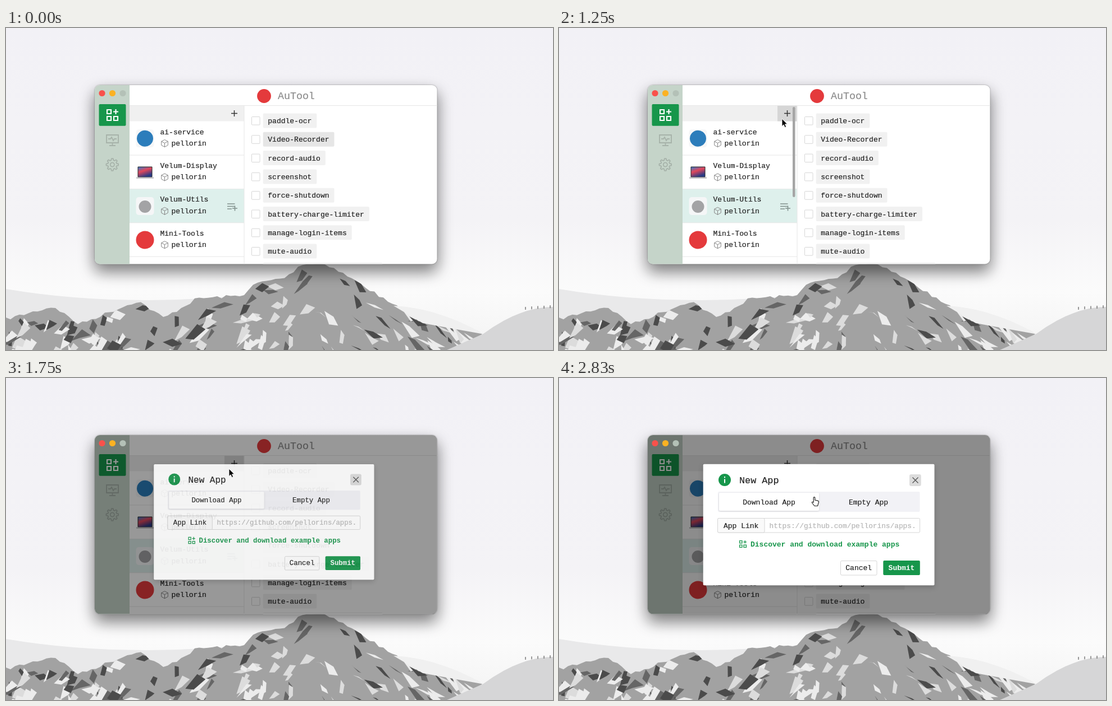
These frames come from a looping animation (974 px wide and 575 px high, 2910 ms). An HTML page:

```html
<!DOCTYPE html>
<html lang="en">
<head>
<meta charset="utf-8">
<title>AuTool</title>
<style>
html, body { margin: 0; width: 100%; height: 100%; overflow: hidden; }
svg { display: block; width: 974px; height: 575px; }
text {
  font: 13px "Liberation Mono", "Courier New", monospace;
  color: #222; fill: currentColor; stroke: currentColor; stroke-width: .2px;
}
.mid { text-anchor: middle; }
.bold { font-weight: bold; stroke: none; }
.shadow { filter: drop-shadow(0 13px 14px #0006) drop-shadow(0 0 1px #0006); }
</style>
</head>
<body>
<svg id="stage" viewBox="0 0 974 575"></svg>
<script>
const GREEN = '#17964b', RED = '#e43a3c', BORDER = '#d6d6d6', DULL = '#a6b2a9', LOOP = 2910;

const rect = (x, y, w, h, fill, more = '') =>
  `<rect x="${x}" y="${y}" width="${w}" height="${h}" fill="${fill}" ${more}/>`;
const disc = (x, y, r, fill, more = '') => `<circle cx="${x}" cy="${y}" r="${r}" fill="${fill}" ${more}/>`;
const label = (x, y, s, more = '') => `<text x="${x}" y="${y}" ${more}>${s}</text>`;
const line = (d, color, width = 1) => `<path d="${d}" fill="none" stroke="${color}" stroke-width="${width}"/>`;
const shape = (d, fill) => `<path d="M${d}Z" fill="${fill}"/>`;
const at = (x, y, s, scale = 1) => `<g transform="translate(${x} ${y}) scale(${scale})">${s}</g>`;
const repeat = (n, f) => Array.from({ length: n }, (_, i) => f(i)).join('');
const plus = (x, y, r, color, width) =>
  line(`M${x - r} ${y}h${2 * r}M${x} ${y - r}v${2 * r}`, color, width);
const field = (x, y, w, fill) => rect(x, y, w, 25.5, fill, `rx="2" stroke="${BORDER}"`);

let seed = 7;
const random = () => (seed = seed * 16807 % 2147483647) / 2147483647;
const jitter = r => (random() * 2 - 1) * r;

// linear interpolation through the main summits and saddles
const summits = [[0, 520], [85, 497], [130, 529], [235, 487], [281, 518], [340, 483], [420, 478],
  [445, 456], [500, 445], [526, 421], [570, 421], [640, 462], [690, 496], [860, 550]];

function ridge(x) {
  const i = summits.findIndex(p => p[0] > x);
  const [a, y] = summits[i - 1], [b, v] = summits[i];
  return y + (v - y) * (x - a) / (b - a);
}

function shard() {
  const x = random() * 850, top = ridge(x), depth = random();
  const y = top + depth * (575 - top), w = 5 + random() * 13, lean = x < 540 ? -1 : 1;
  const tone = ['#4b4b4b', '#666', '#dcdcdc', '#ececec'][Math.floor(random() * 4)];
  return shape(`${x} ${y}l${w} ${6 + jitter(5)} ${lean * w + jitter(9)} ${12 + jitter(8)} ${-w} ${jitter(9)}`, tone);
}

function landscape() {
  const outline = repeat(107, i => `L${i * 8} ${ridge(i * 8) + jitter(3)}`).slice(1) + 'L800 575H0';
  return rect(0, 0, 974, 575, 'url(#sky)')
    + shape('0 466Q200 500 440 476V575H0', '#e9e9ea')
    + `<clipPath id="rock">${shape(outline, '#000')}</clipPath>`
    + shape(outline, '#a2a2a2')
    + `<g clip-path="url(#rock)">${repeat(150, shard)}</g>`
    + shape('690 496Q770 500 852 547L742 527', '#f0f0f0')
    + shape('974 498Q915 498 850 546L785 575H974', '#d6d6d7')
    + repeat(5, i => line(`M${925 + i * 11} ${498 - i * .7}v5`, '#666', 1.3));
}

const appsIcon = color =>
  line('M1 1h7v7h-7zM1 13h7v7h-7zM13 13h7v7h-7z', color, 2.1) + plus(16.5, 4.5, 4.5, color, 2.1);
const monitorIcon = line('M1 1h21v14H1zM11.5 15v5M6 20h11M4 8h4l2-3 3 6 2-3h4', DULL, 1.8);
const cubeIcon = line('M0-6.5L5.8-3.5V3.3L0 6.5-5.8 3.3V-3.5ZM-5.8-3.5L0-.5 5.8-3.5M0-.5V6.5', '#858585');

function gearIcon() {
  const teeth = repeat(96, i => {
    const a = i * Math.PI / 48, r = 9.4 + 1.5 * Math.tanh(3 * Math.cos(8 * a));
    return `${i ? 'L' : 'M'}${r * Math.cos(a)} ${r * Math.sin(a)}`;
  });
  return line(teeth + 'Z', DULL, 1.8) + disc(0, 0, 3.6, 'none', `stroke="${DULL}" stroke-width="1.8"`);
}

const apps = [
  ['ai-service', disc(0, 0, 14.5, '#2c7dbb')],
  ['Velum-Display', rect(-13, -10, 26, 19, '#222', 'rx="1"') + rect(-12, -9, 24, 17, 'url(#screen)')
    + rect(-15.5, 9, 31, 2, '#b4b4b8')],
  ['Velum-Utils', disc(0, 1, 11, '#a3a3a5')],
  ['Mini-Tools', disc(0, 0, 16, RED)]
];

function appRow([name, icon], i) {
  const boxed = i % 2 ? '' : rect(-16, -16, 32, 32, '#f5f6f7', 'rx="5"');
  return at(220, 166.5 + i * 60.4,
    (i == 2 ? rect(0, .5, 204, 60, '#def0ec') : '')
    + at(27.5, 30.7, boxed + icon)
    + label(54.5, 23, name) + at(62.5, 39.5, cubeIcon) + label(74.5, 43.5, 'pellorin')
    + line('M0 60.5H204', '#e6e6e6'));
}

const tools = ['paddle-ocr', 'Video-Recorder', 'record-audio', 'screenshot', 'force-shutdown',
  'battery-charge-limiter', 'manage-login-items', 'mute-audio', ' '.repeat(25)];

const toolRow = (name, i) => at(437, 165.5 + i * 33.3,
  (name.trim() && rect(.5, -7, 14.5, 14.5, '#fff', `rx="1" stroke="${BORDER}"`))
  + rect(20.7, -13, name.length * 7.8 + 17.6, 26, '#f1f1f1', `rx="2" id="tool${i}"`)
  + label(29.3, 4.5, name));

const appWindow =
  rect(158, 102, 609.5, 319.5, '#fff', 'rx="9" class="shadow"')
  + '<g clip-path="url(#frame)">'
  + rect(158, 102, 62, 320, '#c5d4c9')
  + rect(165.5, 136, 48, 38.7, GREEN, 'rx="2"')
  + at(179, 145, appsIcon('#fff')) + at(178, 190, monitorIcon) + at(189.3, 244, gearIcon())
  + disc(459.5, 121.5, 12.4, RED)
  + label(484, 127.3, 'AuTool', 'style="font-size:18.3px;color:#8c8c8c"')
  + rect(220, 139, 204, 27.5, '#f0f0f0')
  + rect(389, 139, 34.5, 27.5, '#d6d6d6', 'id="addHover"')
  + plus(406.5, 152.5, 5.5, '#333', 1.5)
  + apps.map(appRow).join('')
  + line('M394 314h13.5M394 318.5h13.5M394 323h8', '#80908c', 1.6) + plus(407.5, 322, 4.5, '#80908c', 1.6)
  + rect(416, 141, 4.5, 161, '#a5a5a5', 'rx="2.2" id="scrollbar"')
  + line('M220 138.5H768M424 139V422', '#e6e6e6')
  + tools.map(toolRow).join('')
  + rect(158, 102, 610, 320, '#000', 'id="mask"')
  + '</g>'
  + ['#f9514b', '#fbb223', '#b4c1b7'].map((c, i) => disc(171 + i * 18.5, 116.5, 5.6, c)).join('');

const dialog =
  rect(256.7, 153.7, 411.8, 216.5, '#fff', 'rx="2" style="filter:drop-shadow(0 3px 5px #0003)"')
  + disc(295, 182, 11, GREEN) + line('M295 180.5v7M295 176v2.2', '#fff', 2)
  + label(321, 187.8, 'New App', 'style="font-size:16.8px"')
  + rect(624, 172, 20.7, 21, '#dcdcdc', 'rx="3" id="closeHover"')
  + line('M629.5 177.5l10 10M639.5 177.5l-10 10', '#555', 1.4)
  + rect(283, 203, 359.5, 36, '#f2f2f6', 'rx="2"')
  + rect(285, 205, 178, 32, '#fff', 'rx="2" style="filter:drop-shadow(0 1px 1.5px #0002)"')
  + label(374, 225.5, 'Download App', 'class="mid"') + label(551, 225.5, 'Empty App', 'class="mid"')
  + field(282.5, 250.5, 360, '#fff') + field(282.5, 250.5, 83.5, '#fafafa')
  + label(293, 267.5, 'App Link')
  + label(374.5, 267.5, 'https://github.com/pellorins/apps.', 'style="color:#b5b5b5;font-size:12.8px"')
  + at(321, 290, appsIcon(GREEN), .62)
  + label(341, 301, 'Discover and download example apps', `class="bold" style="color:${GREEN}"`)
  + field(501.5, 326.5, 64.5, '#fff') + label(533.7, 343, 'Cancel', 'class="mid"')
  + rect(577.3, 326, 65.5, 26, GREEN, 'rx="2"')
  + label(610, 343, 'Submit', 'class="mid bold" style="color:#fff"');

const cursor =
  '<path id="arrow" d="M0 0V13.5L3.1 10.7 5.2 15.5 7.6 14.5 5.5 9.8H9.6Z" stroke="#fff" stroke-width=".9"/>'
  + '<path id="hand" d="M4.2 10V2a1.3 1.3 0 0 1 2.6 0V6l5 1.2q1.8.5 1.6 2.3l-1.8 7H6L2 11.5Q0 8 4.2 10Z" fill="#fff" stroke="#222" stroke-width="1.2"/>';

stage.innerHTML = `<defs>
  <linearGradient id="sky" x2="0" y2="1"><stop stop-color="#f2f1f6"/><stop offset=".6" stop-color="#f4f3f6"/>
    <stop offset=".82" stop-color="#fbfbfb"/><stop offset="1" stop-color="#f3f3f3"/></linearGradient>
  <linearGradient id="screen" x2=".5" y2="1"><stop stop-color="#3b79c9"/><stop offset=".45" stop-color="#e2475a"/>
    <stop offset="1" stop-color="#283a86"/></linearGradient>
  <clipPath id="frame">${rect(158, 102, 609.5, 319.5, '#fff', 'rx="9"')}</clipPath></defs>
  ${landscape()}${appWindow}<g id="modal">${dialog}</g><g id="pointer">${cursor}</g>`;

const $ = id => document.getElementById(id);
const set = (id, name, value) => $(id).setAttribute(name, value);
const show = (id, on) => set(id, 'display', on ? 'inline' : 'none');
const progress = (k, from, to) => Math.min(1, Math.max(0, (k - from) / (to - from)));

function draw(now) {
  // the picture advances in twelve steps a second
  const k = Math.floor((now % LOOP + 4) * .012);
  const open = k >= 20, hand = k >= 24;
  const rest = open ? .19 ** (k - 20) : 1;

  show('modal', open);
  show('mask', open);
  show('closeHover', k > 20);
  set('mask', 'opacity', .45 - .25 * rest);
  set('modal', 'opacity', 1 - .55 * rest);
  set('modal', 'transform', `translate(394 161) scale(${1 - .25 * rest}) translate(-394 -161)`);

  set('tool1', 'fill', k < 13 ? '#e6e6e6' : '#f1f1f1');
  show('addHover', k >= 15 && k < 22);
  show('scrollbar', k >= 14 && k < 21);

  const enter = progress(k, 11, 12), aim = progress(k, 12, 15), leave = progress(k, 22, 25);
  set('pointer', 'transform',
    `translate(${470 - 59 * enter - 14 * aim + 52 * leave} ${203 - 7 * enter - 34 * aim + 50 * leave})`);
  show('arrow', k >= 11 && !hand);
  show('hand', hand);
  requestAnimationFrame(draw);
}
draw(performance.now());
</script>
</body>
</html>
```
